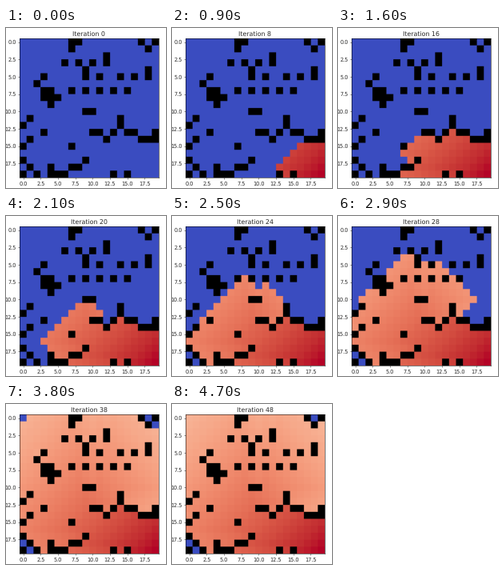
Recreate the animation shown at these times as a matplotlib script. Size 200x200 px, loop 4.9 s.

```python
import matplotlib.pyplot as plt
import numpy as np
from matplotlib.animation import FuncAnimation

SIZE, DPI = 200, 50
GRID = 20
GAMMA = 0.99
SLOTS, SLOT_MS = 49, 100
FONT_SCALE = 0.938
CELL_SAMPLES = 18
INK = "0.15"

# Wall paths as (row, column) corner points.
RIDGE = [(13, 10), (13, 11), (14, 12), (12, 14), (13, 15), (13, 16),
         (14, 17), (14, 19), (13, 19)]
CLUSTER = [(7, 4), (7, 3), (8, 3), (8, 5), (9, 4)]
POCKETS = [[(0, 17), (1, 18), (0, 19)], [(19, 0), (18, 1), (19, 2)]]
BARS = [[(0, 7), (0, 8)], [(10, 9), (10, 10)], [(19, 4), (19, 6)]]
# Upper cells of two-cell walls.
SLASHES = [(5, 3), (11, 1), (14, 1), (17, 9)]
POSTS = [(0, 7), (2, 12), (4, 9), (4, 18), (11, 14)]


def draw_path(mask, points):
    for (r0, c0), (r1, c1) in zip(points, points[1:]):
        steps = max(abs(r1 - r0), abs(c1 - c0)) + 1
        rows = np.linspace(r0, r1, steps).round().astype(int)
        columns = np.linspace(c0, c1, steps).round().astype(int)
        mask[rows, columns] = True


def build_walls():
    mask = np.zeros((GRID, GRID), dtype=bool)
    for path in [RIDGE, CLUSTER, *POCKETS, *BARS]:
        draw_path(mask, path)
    for row, column in SLASHES:
        draw_path(mask, [(row, column), (row + 1, column - 1)])
    for row, column in POSTS:
        draw_path(mask, [(row, column), (row + 1, column)])

    # Dotted rows.
    mask[3, 6:13:2] = True
    mask[5, 9:12:2] = True
    mask[5, 14:19:2] = True
    mask[7, 7:16:2] = True
    mask[19, 13:16:2] = True

    # A few loose blocks on the left side.
    rng = np.random.default_rng(4)
    rows, columns = rng.integers(8, 19, 5), rng.integers(0, 8, 5)
    mask[rows, columns] = True
    return mask


def sweep(values, walls):
    """One step of value iteration towards the bottom-right goal."""
    padded = np.pad(values, 1)
    best = np.max([padded[:-2, 1:-1], padded[2:, 1:-1],
                   padded[1:-1, :-2], padded[1:-1, 2:]], axis=0)
    result = GAMMA * best
    result[-1, -1] = 1
    result[walls] = 0
    return result


def iteration_at(slot):
    """Nearly one iteration per slot, catching up towards the end."""
    pace = np.interp(slot, [0, 9, 16, 17, 25, 29, 34, 47],
                     [0, 8, 16, 16, 24, 28, 34, 48])
    return int(pace + 1e-9)


def render(values, walls):
    colors = plt.get_cmap("coolwarm")(values)[..., :3]
    colors[walls] = 0
    return np.kron(colors, np.ones((CELL_SAMPLES, CELL_SAMPLES, 1)))


walls = build_walls()
history = [np.zeros((GRID, GRID))]
for _ in range(iteration_at(SLOTS - 1)):
    history.append(sweep(history[-1], walls))

plt.rcParams.update({"font.family": "DejaVu Sans", "text.hinting": "none",
                     "text.color": INK, "xtick.color": INK,
                     "ytick.color": INK})
fig = plt.figure(figsize=(SIZE / DPI, SIZE / DPI), dpi=DPI, facecolor="white")
left, bottom, side = 17.2, 13.3, 173.3
ax = fig.add_axes([left / SIZE, bottom / SIZE, side / SIZE, side / SIZE])

image = ax.imshow(render(history[0], walls), interpolation="hanning",
                  extent=(-0.5, GRID - 0.5, GRID - 0.5, -0.5))
ticks = np.arange(0, GRID, 2.5)
labels = [f"{tick:.1f}" for tick in ticks]
ax.set_xticks(ticks, labels)
ax.set_yticks(ticks, labels)
ax.tick_params(labelsize=10 * FONT_SCALE, length=3.5 * FONT_SCALE,
               pad=3.5 * FONT_SCALE, width=0.8 * FONT_SCALE)
for spine in ax.spines.values():
    spine.set_linewidth(0.8 * FONT_SCALE)
title = ax.set_title("", fontsize=12 * FONT_SCALE, pad=6 * FONT_SCALE)


def update(slot):
    iteration = iteration_at(slot)
    image.set_data(render(history[iteration], walls))
    title.set_text(f"Iteration {iteration}")
    return image, title


anim = FuncAnimation(fig, update, frames=SLOTS, interval=SLOT_MS,
                     repeat=True, repeat_delay=0)
plt.show()
```
